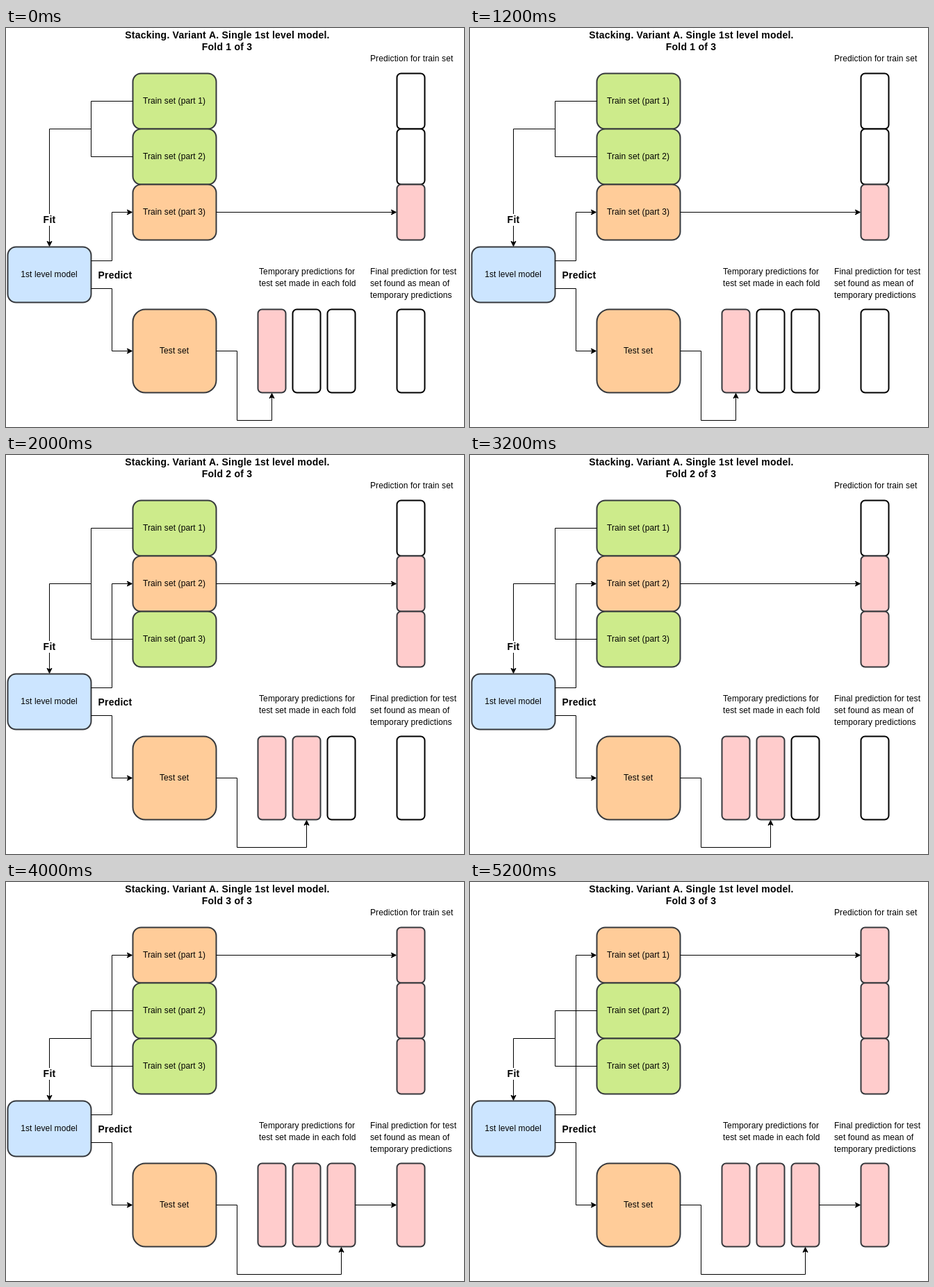
Animation of 659x575 px, one loop 6 s. Source, as an HTML page with a canvas:

```html
<!DOCTYPE html>
<html lang="en">
<head>
<meta charset="utf-8">
<title>Stacking folds</title>
<style>
  html, body { margin: 0; width: 100%; height: 100%; overflow: hidden; background: #fff; }
  canvas { display: block; }
</style>
</head>
<body>
<canvas id="stage" width="659" height="575"></canvas>
<script>
const ctx = document.getElementById('stage').getContext('2d');
const FOLD_MS = 2000, FOLDS = 3;
const GREEN = '#cdeb8b', ORANGE = '#ffcc99', BLUE = '#cce5ff', PINK = '#ffcccc', INK = '#36393d';
const FONT = '"Liberation Sans", Arial, sans-serif';
const partY = part => 105 + 80 * part;

function box(x, y, w, h, radius, fill) {
  ctx.beginPath();
  ctx.roundRect(x, y, w, h, radius);
  ctx.fillStyle = fill || '#fff';
  ctx.fill();
  ctx.strokeStyle = fill ? INK : '#000';
  ctx.lineWidth = 2;
  ctx.stroke();
}

function line(points) {
  ctx.beginPath();
  points.forEach(([x, y]) => ctx.lineTo(x, y));
  ctx.strokeStyle = '#000';
  ctx.lineWidth = 1;
  ctx.stroke();
}

// Polyline whose last segment carries a notched arrowhead.
function arrow(...points) {
  const [[px, py], [ex, ey]] = points.slice(-2);
  const length = Math.hypot(ex - px, ey - py);
  const ux = (ex - px) / length, uy = (ey - py) / length;
  const at = (back, side) => [ex - ux * back - uy * side, ey - uy * back + ux * side];
  line([...points.slice(0, -1), at(6.4, 0)]);
  ctx.beginPath();
  [at(1.1, 0), at(8.1, 3.5), at(6.4, 0), at(8.1, -3.5)].forEach(p => ctx.lineTo(...p));
  ctx.closePath();
  ctx.fillStyle = '#000';
  ctx.fill();
  ctx.stroke();
}

function text(string, x, y, { bold = false, align = 'center' } = {}) {
  ctx.font = bold ? `bold 14px ${FONT}` : `12px ${FONT}`;
  ctx.letterSpacing = bold ? '0.22px' : '0.11px';
  ctx.textAlign = align;
  ctx.fillStyle = '#000';
  ctx.fillText(string, x, y);
}

function note(x, lines, y) {
  lines.forEach((s, i) => text(s, x, y + 17 * i, { align: 'left' }));
}

function drawDiagram(fold) {
  const held = FOLDS - 1 - fold;
  const fitted = [0, 1, 2].filter(part => part !== held);
  const joinY = (partY(fitted[0]) + partY(fitted[1])) / 2;
  const last = fold === FOLDS - 1;

  ctx.fillStyle = '#fff';
  ctx.fillRect(0, 0, 659, 575);
  ctx.save();
  ctx.translate(0.5, 0.5);

  for (let part = 0; part < FOLDS; part++) {
    box(182, partY(part) - 40, 120, 80, 12, part === held ? ORANGE : GREEN);
    box(562, partY(part) - 40, 40, 80, 6, part >= held && PINK);
    box(362 + 50 * part, 405, 40, 120, 6, part <= fold && PINK);
  }
  box(2, 315, 120, 80, 12, BLUE);
  box(182, 405, 120, 120, 18, ORANGE);
  box(562, 405, 40, 120, 6, last && PINK);

  line([[182, partY(fitted[0])], [122, partY(fitted[0])],
        [122, partY(fitted[1])], [182, partY(fitted[1])]]);
  arrow([122, joinY], [62, joinY], [62, 315]);
  arrow([122, 335], [152, 335], [152, partY(held)], [182, partY(held)]);
  arrow([122, 375], [152, 375], [152, 465], [182, 465]);
  arrow([302, partY(held)], [562, partY(held)]);
  const tempX = 382 + 50 * fold;
  arrow([302, 465], [332, 465], [332, 565], [tempX, 565], [tempX, 525]);
  if (last) arrow([502, 465], [562, 465]);
  ctx.restore();

  ctx.fillStyle = '#fff';
  ctx.fillRect(53, 268, 19, 17);
  text('Stacking. Variant A. Single 1st level model.', 318.5, 15, { bold: true });
  text(`Fold ${fold + 1} of 3`, 318, 32, { bold: true });
  text('Fit', 62.5, 281, { bold: true });
  text('Predict', 157, 361, { bold: true });
  for (let part = 0; part < FOLDS; part++) {
    text(`Train set (part ${part + 1})`, 242, partY(part) + 4);
  }
  text('1st level model', 62, 359);
  text('Test set', 242, 469);
  note(524, ['Prediction for train set'], 48);
  note(364, ['Temporary predictions for', 'test set made in each fold'], 355);
  note(524, ['Final prediction for test', 'set found as mean of', 'temporary predictions'], 355);
}

const start = performance.now();
function tick() {
  drawDiagram(Math.floor((performance.now() - start) / FOLD_MS) % FOLDS);
  requestAnimationFrame(tick);
}
tick();
</script>
</body>
</html>
```
